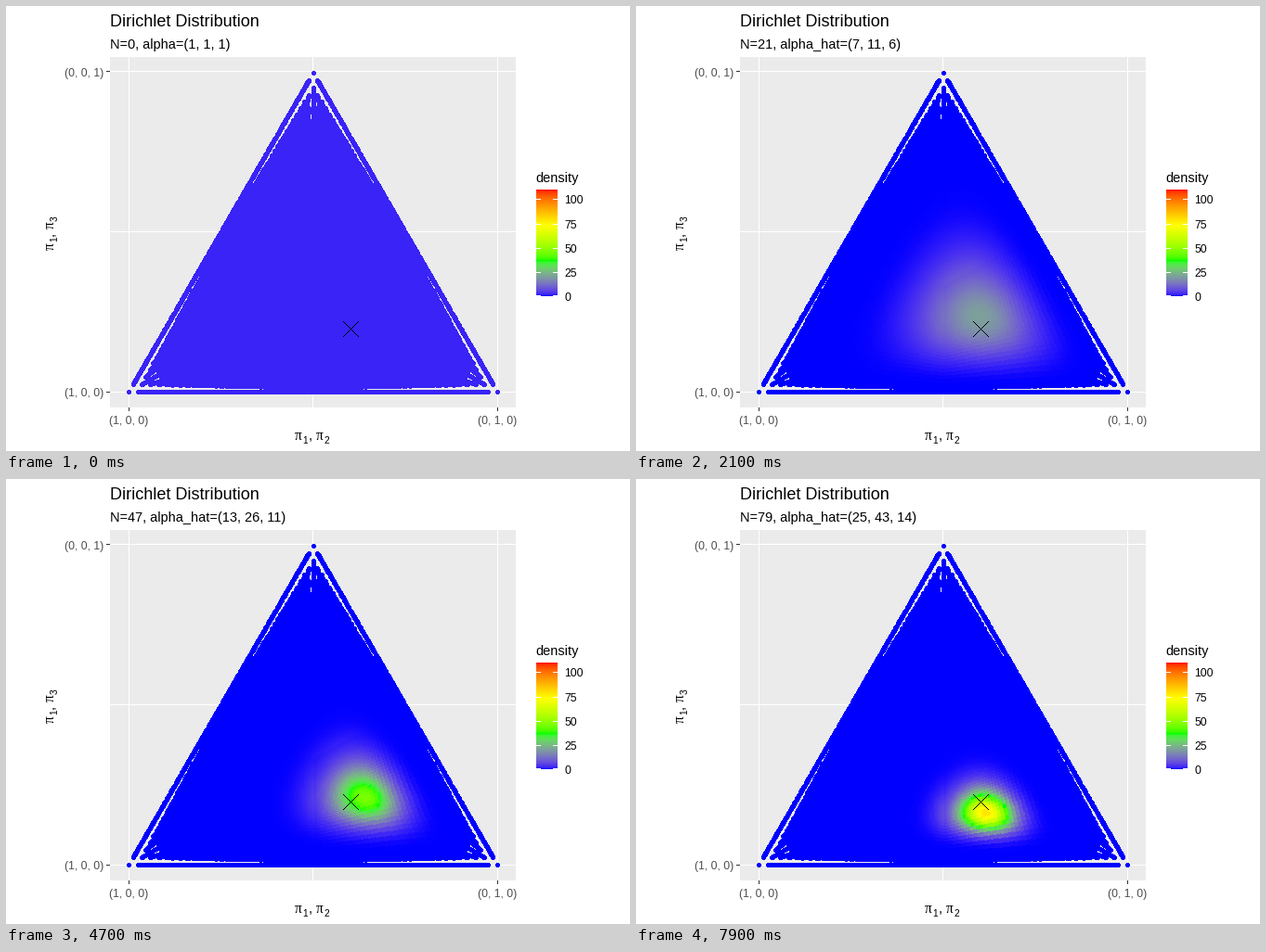
These frames come from a looping animation (672 px wide and 480 px high, 8000 ms). A matplotlib script:

```python
from math import lgamma

import matplotlib.pyplot as plt
import numpy as np
from matplotlib.animation import FuncAnimation

W, H, DPI = 672, 480, 96
FRAMES, STEP_MS = 80, 100
GRID = 40
MAX_DENSITY = 110
LEFT, RIGHT, BASE, APEX = 132, 529, 416, 72
BAR_X, BAR_TOP, BAR_BOTTOM = 571, 198, 313

# Posterior parameters after N observations
KNOTS = {0: (1, 1, 1), 10: (7, 4, 2), 21: (7, 11, 6), 35: (10, 18, 10),
         47: (13, 26, 11), 60: (18, 33, 12), 79: (25, 43, 14)}

plt.rcParams["font.family"] = "Liberation Sans"

# --- colour ramp, interpolated in CIE Lab ---
TO_XYZ = np.array([[0.4124564, 0.3575761, 0.1804375],
                   [0.2126729, 0.7151522, 0.0721750],
                   [0.0193339, 0.1191920, 0.9503041]])
WHITE = TO_XYZ.sum(axis=1)
TO_RGB = np.linalg.inv(TO_XYZ)


def rgb_to_lab(rgb):
    # Only pure primaries are used, so gamma has no effect
    f = np.array(rgb, float) @ TO_XYZ.T / WHITE
    f = np.where(f > 0.008856, np.cbrt(f), 7.787 * f + 16 / 116)
    x, y, z = f.T
    return np.stack([116 * y - 16, 500 * (x - y), 200 * (y - z)], axis=-1)


def lab_to_rgb(lab):
    light, a, b = np.moveaxis(lab, -1, 0)
    y = (light + 16) / 116
    f = np.stack([y + a / 500, y, y - b / 200], axis=-1)
    xyz = np.where(f > 0.20689, f ** 3, (f - 16 / 116) / 7.787) * WHITE
    lin = np.clip(xyz @ TO_RGB.T, 0, 1)
    rgb = np.where(lin > 0.0031308, 1.055 * lin ** (1 / 2.4) - 0.055, 12.92 * lin)
    return np.round(rgb * 255).astype(np.uint8)


STOPS = rgb_to_lab([(0, 0, 1), (0, 1, 0), (1, 1, 0), (1, 0, 0)])


def ramp(t):
    pos = np.linspace(0, 1, 4)
    return lab_to_rgb(np.stack([np.interp(t, pos, ch) for ch in STOPS.T], axis=-1))


# --- simplex points, drawn as small hard-edged discs ---
def simplex_discs():
    c, b, a = np.meshgrid(*[np.arange(GRID + 1)] * 3, indexing="ij")
    p = np.stack([a.ravel(), b.ravel(), c.ravel()], axis=1)[1:].astype(float)
    p /= p.sum(axis=1, keepdims=True)
    px = np.floor(LEFT + (RIGHT - LEFT) * (p[:, 1] + p[:, 2] / 2) + 0.5).astype(int)
    py = np.floor(BASE - (BASE - APEX) * p[:, 2] + 0.5).astype(int)
    owner = np.full((H, W), -1)
    order = np.arange(len(p))
    for dy in range(-2, 3):
        for dx in range(-2, 3):
            if dx * dx + dy * dy <= 5:
                np.maximum.at(owner, (py + dy, px + dx), order)
    mask = owner >= 0
    return mask, p[owner[mask]]


def density(p, alpha):
    log_norm = lgamma(sum(alpha)) - sum(lgamma(a) for a in alpha)
    return np.exp(log_norm) * np.prod(p ** (np.array(alpha) - 1.0), axis=1)


def alpha_path():
    path = [KNOTS[0]]
    times = list(KNOTS)
    for n0, n1 in zip(times, times[1:]):
        start, end = np.array(KNOTS[n0]), np.array(KNOTS[n1])
        now = start.copy()
        for n in range(n0 + 1, n1 + 1):
            goal = start + (end - start) * (n - n0) / (n1 - n0)
            now[np.argmax(goal - now)] += 1
            path.append(tuple(int(v) for v in now))
    return path


def backdrop():
    img = np.full((H, W, 3), 255, np.uint8)
    img[55:433, 112:549] = 235
    for y in (70, 243, 416):
        img[y, 112:549] = 255
    for x in (LEFT, 330, RIGHT):
        img[55:433, x] = 255
    for y in (70, 416):
        img[y, 108:112] = 51
    for x in (LEFT, RIGHT):
        img[433:437, x] = 51
    rows = np.arange(BAR_TOP, BAR_BOTTOM)
    span = BAR_BOTTOM - BAR_TOP
    img[rows, BAR_X:BAR_X + 23] = ramp((BAR_BOTTOM - 0.5 - rows) / span)[:, None]
    for v in range(0, 101, 25):
        y = min(bar_y(v), BAR_BOTTOM - 1)
        img[y, BAR_X:BAR_X + 5] = 255
        img[y, BAR_X + 18:BAR_X + 23] = 255
    return img


def bar_y(v):
    return round(BAR_BOTTOM - v / MAX_DENSITY * (BAR_BOTTOM - BAR_TOP))


fig = plt.figure(figsize=(W / DPI, H / DPI), dpi=DPI, facecolor="white")
ax = fig.add_axes([0, 0, 1, 1])
ax.axis("off")


def text(x, y, s, px, color="black", **kw):
    return ax.text(x, y, s, fontsize=px * 72 / DPI, color=color,
                   va="baseline", **kw)


def pi_pair(x, y, second, rotated=False):
    """Axis title such as 'pi_1, pi_2', starting at (x, y)."""
    parts = [(0, 0, "π", 15.5, "Liberation Serif"), (8.5, 3.5, "1", 10.3, None),
             (14.8, 0, ",", 14.5, None), (23, 0, "π", 15.5, "Liberation Serif"),
             (31.5, 3.5, second, 10.3, None)]
    for along, drop, s, px, family in parts:
        dx, dy = (drop, -along) if rotated else (along, drop)
        text(x + dx, y + dy, s, px, family=family or "Liberation Sans",
             rotation=90 if rotated else 0, rotation_mode="anchor")


mask, points = simplex_discs()
alphas = alpha_path()
base = backdrop()
picture = ax.imshow(base, extent=(0, W, H, 0), interpolation="nearest")
ax.set_xlim(0, W)
ax.set_ylim(H, 0)
ax.set_aspect("auto")

text(112, 22, "Dirichlet Distribution", 18)
subtitle = text(112, 46, "", 14.5)
GREY = "#4d4d4d"
text(132.5, 451, "(1, 0, 0)", 12.2, GREY, ha="center")
text(529.5, 451, "(0, 1, 0)", 12.2, GREY, ha="center")
text(105.5, 76, "(0, 0, 1)", 12.2, GREY, ha="right")
text(105.5, 421, "(1, 0, 0)", 12.2, GREY, ha="right")
pi_pair(311, 468, "2")
pi_pair(52, 263, "3", rotated=True)
text(570, 190, "density", 14.5)
for v in range(0, 101, 25):
    text(601, bar_y(v) + 5, str(v), 12.2)


def update(n):
    img = base.copy()
    img[mask] = ramp(density(points, alphas[n]) / MAX_DENSITY)
    k = np.arange(-8, 9)
    img[348 + k, 371 + k] = 0
    img[348 + k, 371 - k] = 0
    picture.set_data(img)
    name = "alpha_hat" if n else "alpha"
    subtitle.set_text(f"N={n}, {name}={alphas[n]}")
    return picture, subtitle


anim = FuncAnimation(fig, update, frames=FRAMES, interval=STEP_MS,
                     repeat=True, repeat_delay=0)
plt.show()
```
